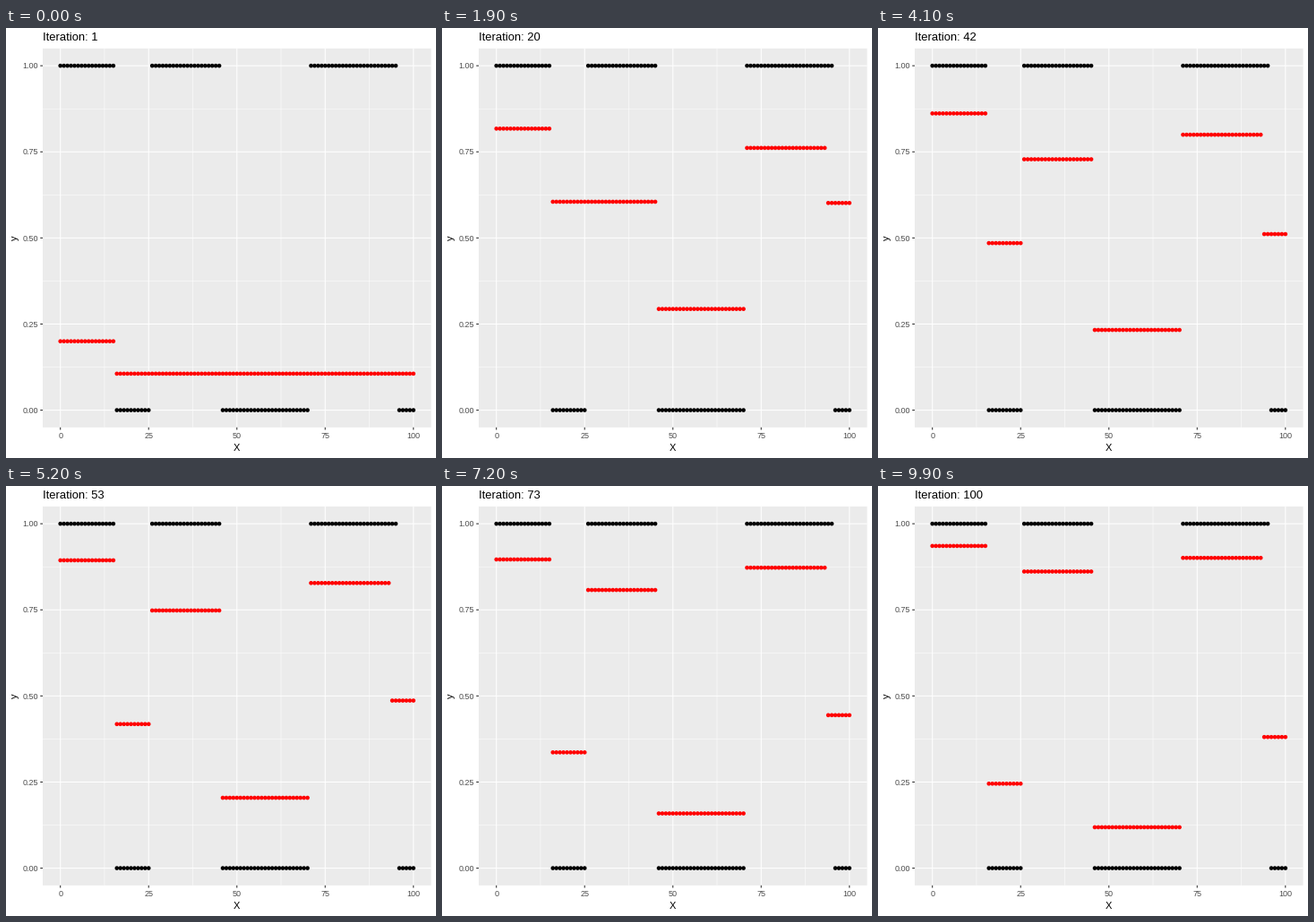
Write a matplotlib script that moves like this. It is 480 by 480 pixels and loops after 10000 ms.

```python
import matplotlib.pyplot as plt
import numpy as np
from matplotlib.animation import FuncAnimation
from matplotlib.patches import Rectangle

SIZE, DPI = 480, 72
LEFT, RIGHT, TOP, BOTTOM = 41.0, 474.5, 22.9, 445.8
ROUNDS, RATE, MIN_LEAF = 100, 0.2, 7

plt.rcParams["font.family"] = "Liberation Sans"


def px(x):
    return LEFT + (np.asarray(x) + 5) / 110 * (RIGHT - LEFT)


def py(y):
    return BOTTOM - (np.asarray(y) + 0.05) / 1.1 * (BOTTOM - TOP)


def fit_stump(resid):
    """Best single-split regression tree, returned as its predictions."""
    n = len(resid)
    cut = np.arange(MIN_LEAF, n - MIN_LEAF + 1)
    left = np.cumsum(resid)[cut - 1]
    right = resid.sum() - left
    k = cut[np.argmax(left**2 / cut + right**2 / (n - cut))]
    return np.where(np.arange(n) < k, resid[:k].mean(), resid[k:].mean())


def boost(target):
    pred, history = np.zeros(len(target)), []
    for _ in range(ROUNDS):
        pred = pred + RATE * fit_stump(target - pred)
        history.append(pred)
    return history


x = np.arange(101)
y = ((x <= 15) | ((x >= 26) & (x <= 45)) | ((x >= 71) & (x <= 95))).astype(float)
history = boost(y)

fig = plt.figure(figsize=(SIZE / DPI, SIZE / DPI), dpi=DPI, facecolor="white")
ax = fig.add_axes([0, 0, 1, 1])
ax.set(xlim=(0, SIZE), ylim=(SIZE, 0))
ax.axis("off")


def line(xs, ys, color, width, z):
    ax.plot(xs, ys, color=color, lw=width, zorder=z, snap=False,
            solid_capstyle="butt")


def label(tx, ty, text, size, color="black", **kw):
    return ax.text(tx, ty, text, fontsize=size, color=color, va="baseline", **kw)


def dots(values, color, z):
    # One size per dot keeps sub-pixel placement.
    return ax.scatter(px(x), py(values), s=np.full(len(x), 4.62**2),
                      color=color, linewidths=0, zorder=z)


ax.add_patch(Rectangle((LEFT, TOP), RIGHT - LEFT, BOTTOM - TOP,
                       fc="#EBEBEB", lw=0, snap=False, zorder=0))

for t in np.arange(0.125, 1, 0.25):
    line([px(100 * t)] * 2, [TOP, BOTTOM], "white", 0.53, 1)
    line([LEFT, RIGHT], [py(t)] * 2, "white", 0.53, 1)

for t in np.linspace(0, 1, 5):
    gx, gy = px(100 * t), py(t)
    line([gx] * 2, [TOP, BOTTOM], "white", 1.07, 2)
    line([LEFT, RIGHT], [gy] * 2, "white", 1.07, 2)
    line([gx] * 2, [BOTTOM, BOTTOM + 2.75], "#333333", 1.07, 2)
    line([LEFT - 2.75, LEFT], [gy] * 2, "#333333", 1.07, 2)
    label(gx, 458, f"{100 * t:.0f}", 9, "#4D4D4D", ha="center")
    label(36.1, gy + 3.2, f"{t:.2f}", 9, "#4D4D4D", ha="right")

label(px(50), 472, "X", 11, ha="center")
label(13, py(0.5), "y", 11, ha="right", rotation=90, rotation_mode="anchor")
ax.texts[-1].set_ha("center")
title = label(LEFT, 14, "", 13, ha="left")

dots(y, "black", 3)
red = dots(history[0], "red", 4)


def update(i):
    title.set_text(f"Iteration: {i + 1}")
    red.set_offsets(np.column_stack([px(x), py(history[i])]))
    return title, red


anim = FuncAnimation(fig, update, frames=ROUNDS, interval=100,
                     repeat=True, repeat_delay=0)
plt.show()
```
